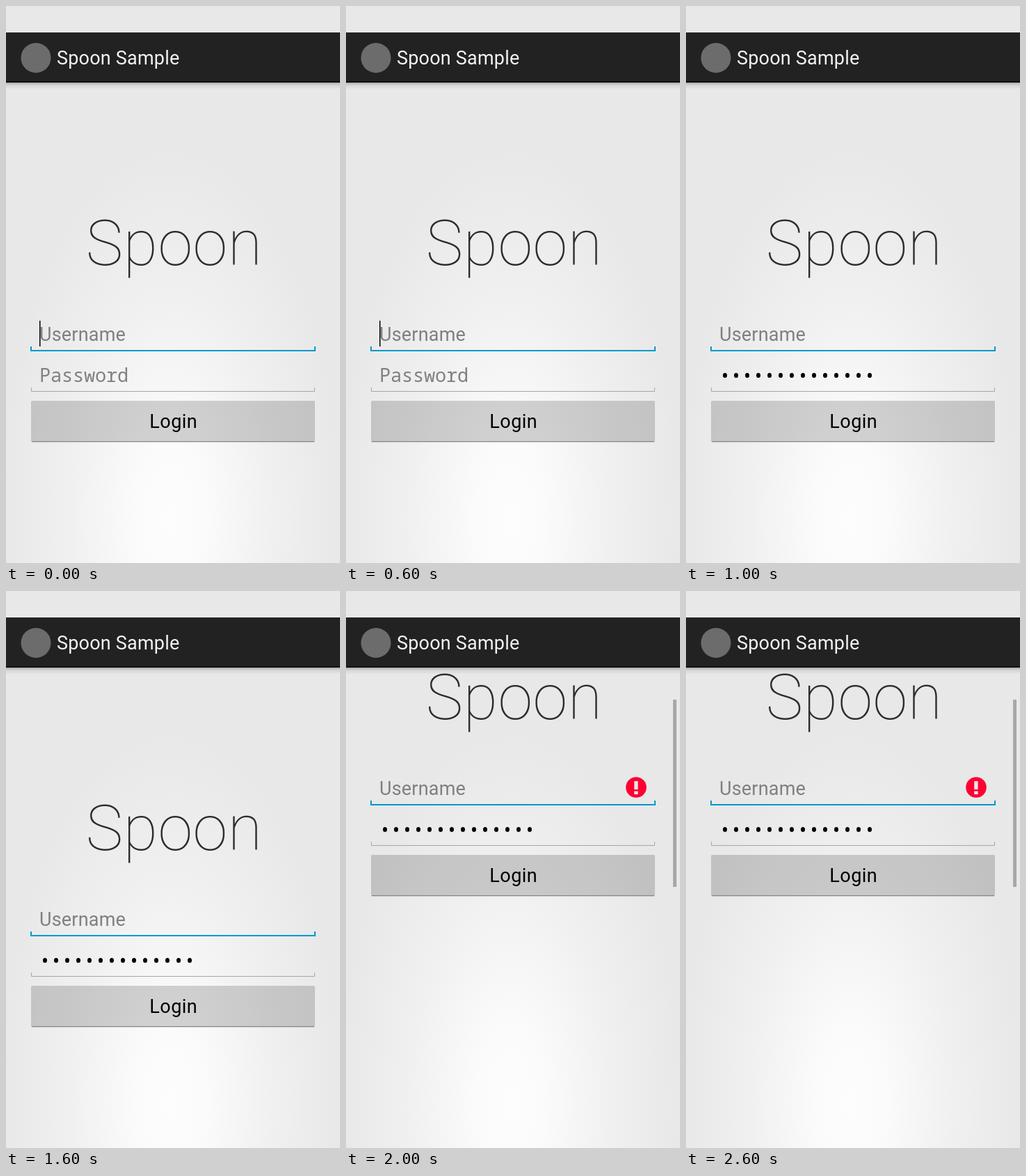
Animation, 480 px wide and 800 px high, one loop 3 s. Source, as an HTML page:

```html
<!DOCTYPE html>
<html lang="en">
<head>
<meta charset="utf-8">
<title>Login screen</title>
<style>
  html, body { margin: 0; width: 100%; height: 100%; overflow: hidden; background: #e8e8e8; }
  svg { display: block; width: 480px; height: 800px; }
  text { font: 27px Roboto, sans-serif; letter-spacing: .2px; }
  .heading { font-size: 90px; font-weight: 100; letter-spacing: .6px; fill: #2c2c2c; }
  .hint { fill: #808080; }
  .mono { font-family: "Noto Sans Mono", monospace; letter-spacing: -.2px; }
  .login { letter-spacing: .5px; }
</style>
</head>
<body>
<svg viewBox="0 0 480 800">
  <defs>
    <radialGradient id="glow">
      <stop offset="0" stop-color="#fdfdfd"/>
      <stop offset=".2" stop-color="#fbfbfb"/>
      <stop offset=".6" stop-color="#f0f0f0"/>
      <stop offset="1" stop-color="#e8e8e8"/>
    </radialGradient>
    <linearGradient id="shade" x2="0" y2="1">
      <stop offset="0" stop-color="#000" stop-opacity=".26"/>
      <stop offset=".4" stop-color="#000" stop-opacity=".07"/>
      <stop offset="1" stop-color="#000" stop-opacity="0"/>
    </linearGradient>
  </defs>

  <rect width="480" height="800" fill="#e8e8e8"/>
  <ellipse cx="236" cy="735" rx="245" ry="535" fill="url(#glow)"/>

  <g id="form">
    <text class="heading" x="114.8" y="372">Spoon</text>

    <text class="hint" x="48" y="481">Username</text>
    <rect id="caret" x="48" y="452" width="1.5" height="37"/>
    <path d="M36 489v6h408v-6" fill="none" stroke="#0099cc" stroke-width="2"/>

    <text class="hint mono" id="hint" x="48" y="540">Password</text>
    <g id="dots"></g>
    <path d="M36.5 548v5.5h407V548" fill="none" stroke="#a6a6a6"/>

    <rect x="36" y="567" width="408" height="59" rx="1.5" fill="#000" fill-opacity=".165"/>
    <path d="M37 625.5h406" stroke="#858585"/>
    <path d="M37 626.5h406" stroke="#000" stroke-opacity=".12"/>
    <text class="login" x="206.2" y="606">Login</text>

    <g id="error">
      <circle cx="417" cy="470" r="14.8" fill="#ff0033"/>
      <path d="M414.2 461h5.4v12h-5.4zM414.2 475.5h5.4v4.5h-5.4z" fill="#e6e6e6"/>
    </g>
  </g>

  <rect id="scrollbar" x="470" y="156" width="5" height="269" fill="#a8a8a8"/>

  <rect y="38" width="480" height="72" fill="#222"/>
  <rect y="108" width="480" height="2" fill="#111"/>
  <rect y="110" width="480" height="10" fill="url(#shade)"/>
  <circle cx="43" cy="74.5" r="21.5" fill="#6c6c6c"/>
  <text x="73" y="84" fill="#f3f3f3">Spoon Sample</text>
</svg>
<script>
  const STEP = 1000;
  const $ = id => document.getElementById(id);

  for (let i = 0; i < 14; i++) {
    const dot = document.createElementNS("http://www.w3.org/2000/svg", "ellipse");
    const attrs = { cx: 56 + 16 * i, cy: 530.5, rx: 3, ry: 3.6 };
    for (const name in attrs) dot.setAttribute(name, attrs[name]);
    $("dots").append(dot);
  }

  // One value per step, held until the next step.
  function play(id, prop, values) {
    const held = [...values, values[values.length - 1]];
    const frames = held.map((value, i) => ({
      [prop]: value, offset: i / values.length, easing: "step-end"
    }));
    const anim = $(id).animate(frames, { duration: STEP * values.length, iterations: Infinity });
    anim.startTime = document.timeline.currentTime;
  }

  const rest = "translate(0px, 0px)";
  play("caret", "opacity", [1, 0, 0]);
  play("hint", "opacity", [1, 0, 0]);
  play("dots", "opacity", [0, 1, 1]);
  play("error", "opacity", [0, 0, 1]);
  play("scrollbar", "opacity", [0, 0, 1]);
  play("form", "transform", [rest, rest, "translate(0px, -188px)"]);
</script>
</body>
</html>
```
